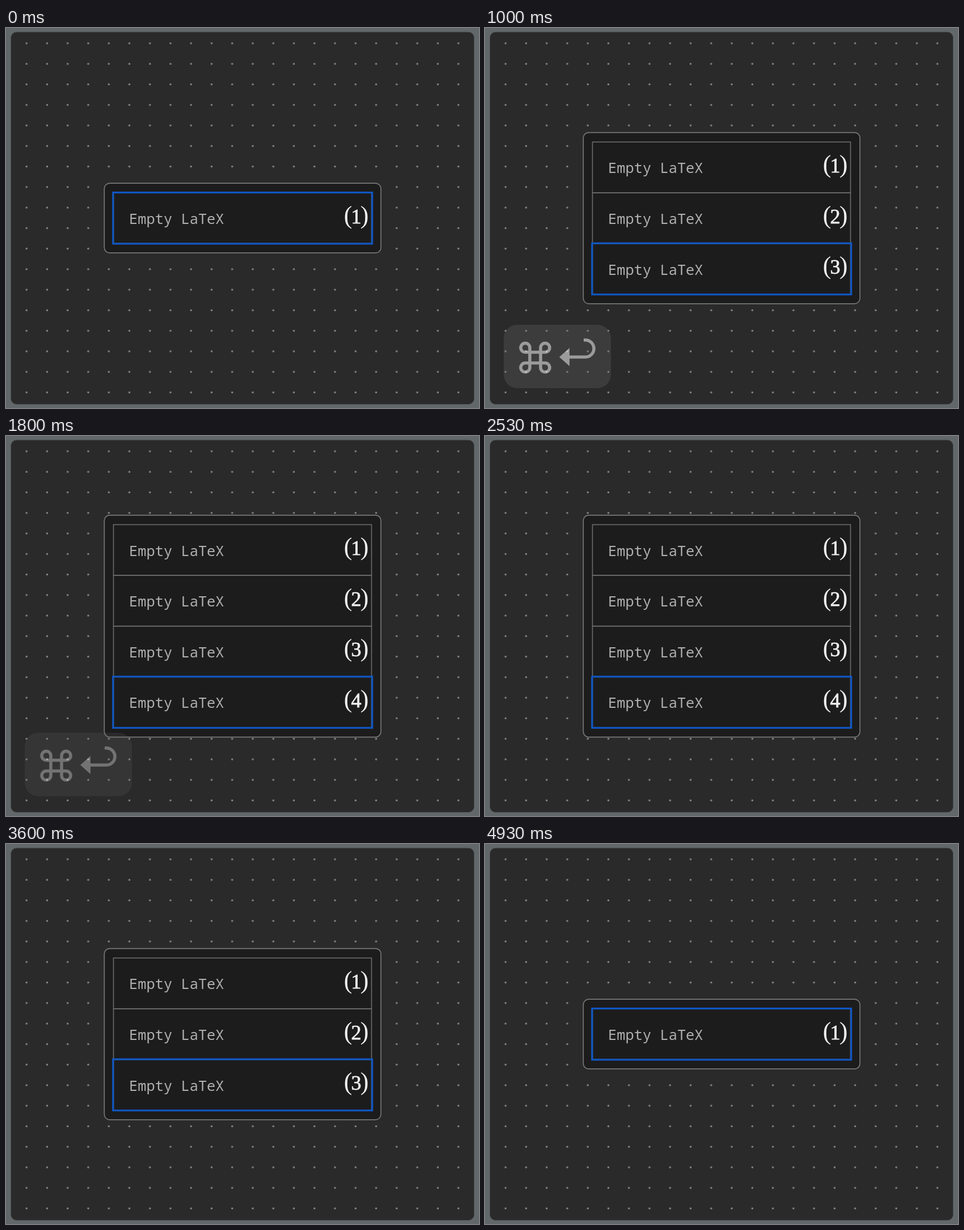
Animation of 834x671 px, one loop 5 s. Source, as an HTML page:

```html
<!DOCTYPE html>
<html lang="en">
<head>
<meta charset="utf-8">
<title>Equation rows</title>
<style>
  html, body { margin: 0; height: 100%; overflow: hidden; background: #62676a; }
  svg { display: block; }
  .label { font: 25.4px "Noto Sans Mono", monospace; fill: #b0b0b0; white-space: pre; }
  .digit, .paren { font-family: "Liberation Serif", serif; fill: #f0f0f0; text-anchor: middle; }
  .digit { font-size: 36px; stroke: #f0f0f0; stroke-width: .8; }
  .paren { font-size: 44px; }
  .icon { fill: none; stroke: #fff; stroke-width: 5.5; stroke-linejoin: round; }
</style>
</head>
<body>
<svg width="834" height="671" viewBox="0 0 834 671">
  <defs>
    <pattern id="dots" x="18.1" y="8.9" width="36.26" height="36.26" patternUnits="userSpaceOnUse">
      <circle cx="18.13" cy="18.13" r="1.75" fill="#858585"/>
    </pattern>
  </defs>
  <rect x="8.5" y="7" width="817" height="657.5" rx="10" fill="#2a2a2a" stroke="#505457"/>
  <rect x="18.1" y="8.9" width="797.7" height="652.7" fill="url(#dots)"/>
  <rect id="card" x="173.3" width="487.8" rx="9.5" fill="#1c1c1c" stroke="#777" stroke-width="1.7"/>
  <g id="rows"></g>
  <rect id="focus" x="188.8" width="456.9" height="90.4" fill="none" stroke="#1056c2" stroke-width="3.2"/>
  <g id="badge">
    <rect id="plate" x="33" y="524" height="112" rx="24" fill="#6e6e6e" fill-opacity=".5"/>
    <path class="icon" transform="translate(88.5 582)" d="M-9.5-9.5H-17.5A8 8 0 1 1-9.5-17.5V17.5A8 8 0 1 1-17.5 9.5H17.5A8 8 0 1 1 9.5 17.5V-17.5A8 8 0 1 1 17.5-9.5Z"/>
    <g id="enter">
      <path class="icon" d="M146 581H177A15 15 0 0 0 177 551H174"/>
      <path fill="#fff" d="M131 581L149 565V597Z"/>
    </g>
    <path id="erase" class="icon" d="M153 557H187a6 6 0 0 1 6 6V600.500a6 6 0 0 1-6 6H153q-3 0-5-2L134.500 586q-3-4 0-8L148 559q2-2 5-2ZM160 573L178 591M178 573L160 591"/>
  </g>
</svg>
<script>
  const LOOP = 5000, STEP = 200 / 3;
  const MIDDLE = 335.7, ROW = 89.6, PAD = 16.7;
  const HOLD = 360, FADE = 200;
  // Moment of each shortcut and the number of rows it leaves
  const presses = [[50, 2], [546, 3], [1308, 4], [2640, 3], [3690, 2], [4350, 1]];

  const el = id => document.getElementById(id);
  const set = (id, attrs) => {
    for (const name in attrs) el(id).setAttribute(name, attrs[name]);
  };
  const show = (node, visible) => node.setAttribute("display", visible ? "inline" : "none");

  el("rows").innerHTML = [1, 2, 3, 4].map(n => `
    <g transform="translate(0 ${(n - 1) * ROW})">
      <rect x="189.5" width="455" height="${ROW}" fill="none" stroke="#6c6c6c" stroke-width="1.6"/>
      <text class="label" x="217" y="55">Empty LaTeX</text>
      <text class="paren" x="603" y="53.700">(</text>
      <text class="digit" x="617.5" y="53.700">${n}</text>
      <text class="paren" x="632" y="53.700">)</text>
    </g>`).join("");
  const rows = [...el("rows").children];

  function draw(time) {
    const t = Math.floor((time % LOOP + 4) / STEP) * STEP;
    const done = presses.filter(([at]) => at <= t);
    const [at, count] = done.at(-1) || [-LOOP, 1];
    const top = MIDDLE - count * ROW / 2;
    const erasing = done.length > 3;

    set("card", { y: top - PAD, height: count * ROW + 2 * PAD });
    set("rows", { transform: `translate(0 ${top})` });
    set("focus", { y: top + (count - 1) * ROW - .4 });
    rows.forEach((row, i) => show(row, i < count));

    const alpha = 1 - (t - at - HOLD) / FADE;
    set("badge", { opacity: Math.max(0, Math.min(1, alpha)) });
    set("plate", { width: erasing ? 191 : 189 });
    show(el("enter"), !erasing);
    show(el("erase"), erasing);
  }

  const start = performance.now();
  function tick() {
    draw(performance.now() - start);
    requestAnimationFrame(tick);
  }
  tick();
</script>
</body>
</html>
```
